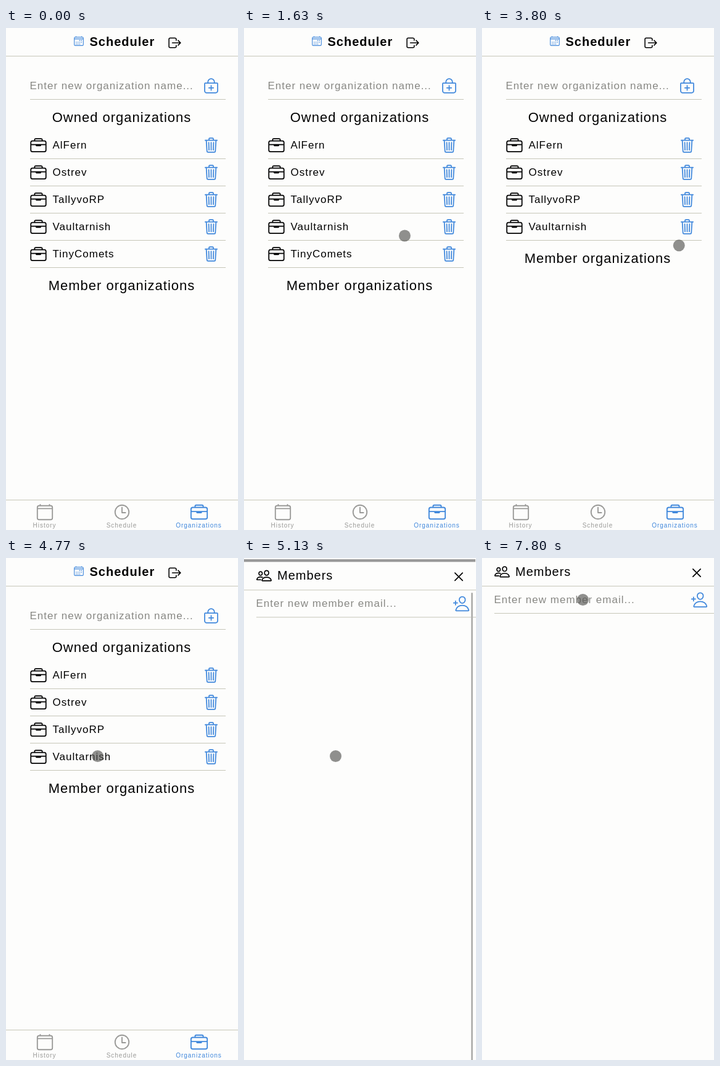
Recreate the animation shown at these times as an HTML page. Size 376 by 812 pixels, loop 8000 ms.

```html
<!DOCTYPE html>
<html lang="en">
<head>
<meta charset="utf-8">
<title>Scheduler</title>
<style>
  html, body { margin: 0; width: 100%; height: 100%; overflow: hidden; background: #fdfdfc; }
  svg { display: block; }
  text { font: 17px "Liberation Sans", Arial, sans-serif; letter-spacing: 1px; white-space: pre; }
  .icon { fill: none; stroke-width: 32; stroke-linecap: round; stroke-linejoin: round; }
</style>
</head>
<body>
<svg id="stage" width="376" height="812" viewBox="0 0 376 812"></svg>
<script>
const LOOP = 8000, HEIGHT = 812, ROW = 44;
const DELETE_AT = 3000, MODAL_AT = 4772, MODAL_TIME = 480;
const PAPER = '#fdfdfc', INK = '#000', BLUE = '#4088dc', GRAY = '#9a9a98', HINT = '#888884', RULE = '#c6c6b8';

// Outline icons on a 512 unit grid
const frame = (x, y, w, h, r) =>
  `M${x + r} ${y}h${w - 2 * r}a${r} ${r} 0 0 1 ${r} ${r}v${h - 2 * r}a${r} ${r} 0 0 1 ${-r} ${r}` +
  `h${2 * r - w}a${r} ${r} 0 0 1 ${-r} ${-r}v${2 * r - h}a${r} ${r} 0 0 1 ${r} ${-r}z`;
const ring = (x, y, rx, ry) => `M${x - rx} ${y}a${rx} ${ry} 0 1 0 ${2 * rx} 0a${rx} ${ry} 0 1 0 ${-2 * rx} 0z`;
const page = frame(48, 80, 416, 384, 48) + 'M128 48v32M384 48v32M464 160H48';
const dots = [[296, 232], [376, 232], [136, 312], [216, 312], [296, 312], [376, 312], [136, 392], [216, 392], [296, 392]]
  .map(([x, y]) => ring(x, y, 8, 8)).join('');
const ICONS = {
  page,
  calendar: page + dots,
  clock: ring(256, 256, 192, 192) + 'M256 128v144h96',
  briefcase: frame(32, 128, 448, 320, 48) +
    'M144 128V96a32 32 0 0 1 32-32h160a32 32 0 0 1 32 32v32M480 240H32M320 240v24a8 8 0 0 1-8 8H200a8 8 0 0 1-8-8v-24',
  trash: 'M112 112l20 320c1 18 14 32 32 32h184c18 0 31-14 32-32l20-320M80 112h352' +
    'M192 112V72a24 24 0 0 1 24-24h80a24 24 0 0 1 24 24v40M256 176v224M184 176l8 224M328 176l-8 224',
  bagAdd: 'M80 176a16 16 0 0 0-16 16v216c0 30 26 56 56 56h272c30 0 56-25 56-55V192a16 16 0 0 0-16-16z' +
    'M160 176v-32a96 96 0 0 1 192 0v32M256 248v136M324 316H188',
  logOut: 'M304 336v40a40 40 0 0 1-40 40H104a40 40 0 0 1-40-40V136a40 40 0 0 1 40-40h152c22 0 48 18 48 40v40' +
    'M368 336l80-80-80-80M176 256h256',
  people: 'M402 168c-3 41-33 72-66 72s-63-31-66-72c-3-42 26-72 66-72s69 30 66 72z' +
    'M336 304c-65 0-128 32-144 95-2 8 3 17 12 17h264c9 0 14-8 12-17C464 335 401 304 336 304z' +
    'M200 186c-2 32-27 58-53 58s-51-26-53-58c-2-34 21-58 53-58s55 25 53 58z' +
    'M206 306c-18-8-38-11-59-11-52 0-102 26-115 76-2 7 3 13 10 13H154',
  personAdd: 'M376 144c-4 53-44 96-88 96s-84-43-88-96c-4-55 35-96 88-96s92 42 88 96z' +
    'M288 304c-87 0-175 48-192 139-2 11 4 21 16 21H464c11 0 18-10 16-21C463 352 375 304 288 304z' +
    'M88 176v112M144 232H32',
  close: 'M368 368L144 144M368 144L144 368',
};

const icon = (name, cx, cy, size, color = INK) =>
  `<path class="icon" stroke="${color}" d="${ICONS[name]}"
    transform="translate(${cx - size / 2} ${cy - size / 2}) scale(${size / 512})"/>`;
const label = (text, x, y, { size = 17, color = INK, anchor = 'start', weight = 400 } = {}) =>
  `<text x="${x}" y="${y}" fill="${color}" text-anchor="${anchor}"
    style="font-size:${size}px;font-weight:${weight}">${text}</text>`;
const heading = (text, y) => label(text, 187.5, y, { size: 22, anchor: 'middle' });
const rule = (x1, x2, y) => `<path d="M${x1} ${y + .5}H${x2}" stroke="${RULE}"/>`;

const row = (name, i) => {
  const y = 189.5 + i * ROW;
  return `<g id="row${i}">${icon('briefcase', 52.5, y, 28)}${label(name, 75.5, y + 5.5)}
    ${icon('trash', 332.5, y, 28, BLUE)}${rule(39, 356, y + 21.5)}</g>`;
};
const tab = (name, text, x, color) =>
  icon(name, x + .5, 783, 30, color) + label(text, x, 808, { size: 10, color, anchor: 'middle' });

document.getElementById('stage').innerHTML = `
  <rect width="376" height="812" fill="${PAPER}"/>
  ${icon('calendar', 118, 21, 18, BLUE)}
  ${label('Scheduler', 135.5, 29, { size: 20, weight: 700 })}
  ${icon('logOut', 273.5, 24, 25)}
  ${rule(0, 376, 45)}
  ${label('Enter new organization name...', 38.5, 99, { color: HINT })}
  ${icon('bagAdd', 332.5, 93.5, 28, BLUE)}
  ${rule(39, 356, 115)}
  ${heading('Owned organizations', 152)}
  ${['AlFern', 'Ostrev', 'TallyvoRP', 'Vaultarnish', 'TinyComets'].map(row).join('')}
  <g id="memberHeading">${heading('Member organizations', 424)}</g>
  ${rule(0, 376, 763)}
  ${tab('page', 'History', 62.5, GRAY)}
  ${tab('clock', 'Schedule', 187.5, GRAY)}
  ${tab('briefcase', 'Organizations', 312.5, BLUE)}
  <rect id="backdrop" y="2" width="375" height="810"/>
  <g id="modal">
    <rect width="376" height="812" fill="${PAPER}"/>
    ${icon('people', 32.5, 22.3, 26.5)}
    ${label('Members', 54, 29, { size: 20 })}
    ${icon('close', 348, 24, 28)}
    ${rule(0, 376, 45)}
    ${label('Enter new member email...', 19.5, 73, { color: HINT })}
    ${icon('personAdd', 352, 67.7, 28, BLUE)}
    ${rule(20, 376, 89)}
    <rect id="scrollbar" x="368" y="50" width="3" height="762" fill="#b4b4b2"/>
    <rect id="caret" x="21" y="58" width="2" height="21" fill="${BLUE}"/>
  </g>
  <circle id="pointer" r="9.5" fill="#545452" fill-opacity=".65"/>`;

const [row4, memberHeading, backdrop, modal, scrollbar, caret, pointer] =
  ['row4', 'memberHeading', 'backdrop', 'modal', 'scrollbar', 'caret', 'pointer'].map(id => document.getElementById(id));

// Pointer stops: time, x, y
const STOPS = [
  [30, -12, 240], [930, 202.5, 322.5], [2500, 340.5, 354.5], [2750, 336, 362], [3000, 336, 362],
  [3330, 342, 356], [3630, 342, 356], [4430, 148.5, 320.5], [5300, 148.5, 320.5], [5800, 168.5, 115.5],
  [6150, 168.5, 115.5], [6530, 154.5, 75], [6680, 154.5, 75], [6850, 157, 62], [7000, 163.5, 67.5], [LOOP, 163.5, 67.5],
];

const clamp = v => Math.min(1, Math.max(0, v));
const ramp = (t, from, to) => clamp((t - from) / (to - from));
const smooth = v => v * v * (3 - 2 * v);

// cubic-bezier(.32, .72, 0, 1)
function sheetEase(x) {
  const curve = (s, a, b) => 3 * (1 - s) ** 2 * s * a + 3 * (1 - s) * s * s * b + s ** 3;
  let lo = 0, hi = 1;
  for (let i = 0; i < 24; i++) {
    const mid = (lo + hi) / 2;
    if (curve(mid, .32, 0) < x) lo = mid; else hi = mid;
  }
  return x >= 1 ? 1 : x <= 0 ? 0 : curve(lo, .72, 1);
}

function pointerAt(t) {
  const next = Math.max(1, STOPS.findIndex(stop => stop[0] > t));
  const [t0, x0, y0] = STOPS[next - 1], [t1, x1, y1] = STOPS[next];
  const k = smooth(ramp(t, t0, t1));
  return [x0 + (x1 - x0) * k, y0 + (y1 - y0) * k];
}

function draw(t) {
  const deleted = t >= DELETE_AT;
  row4.setAttribute('visibility', deleted ? 'hidden' : 'visible');
  memberHeading.setAttribute('transform', `translate(0 ${deleted ? -ROW : 0})`);

  const open = sheetEase(ramp(t, MODAL_AT, MODAL_AT + MODAL_TIME));
  backdrop.setAttribute('opacity', .4 * open);
  modal.setAttribute('transform', `translate(0 ${HEIGHT * (1 - open)})`);
  scrollbar.setAttribute('opacity', 1 - ramp(t, 5400, 5600));
  caret.setAttribute('opacity', ramp(t, 7270, 7400) - ramp(t, 7670, 7800));

  pointer.setAttribute('transform', `translate(${pointerAt(t)})`);
}

const start = performance.now();
(function tick() {
  draw((performance.now() - start) % LOOP);
  requestAnimationFrame(tick);
})();
</script>
</body>
</html>
```
